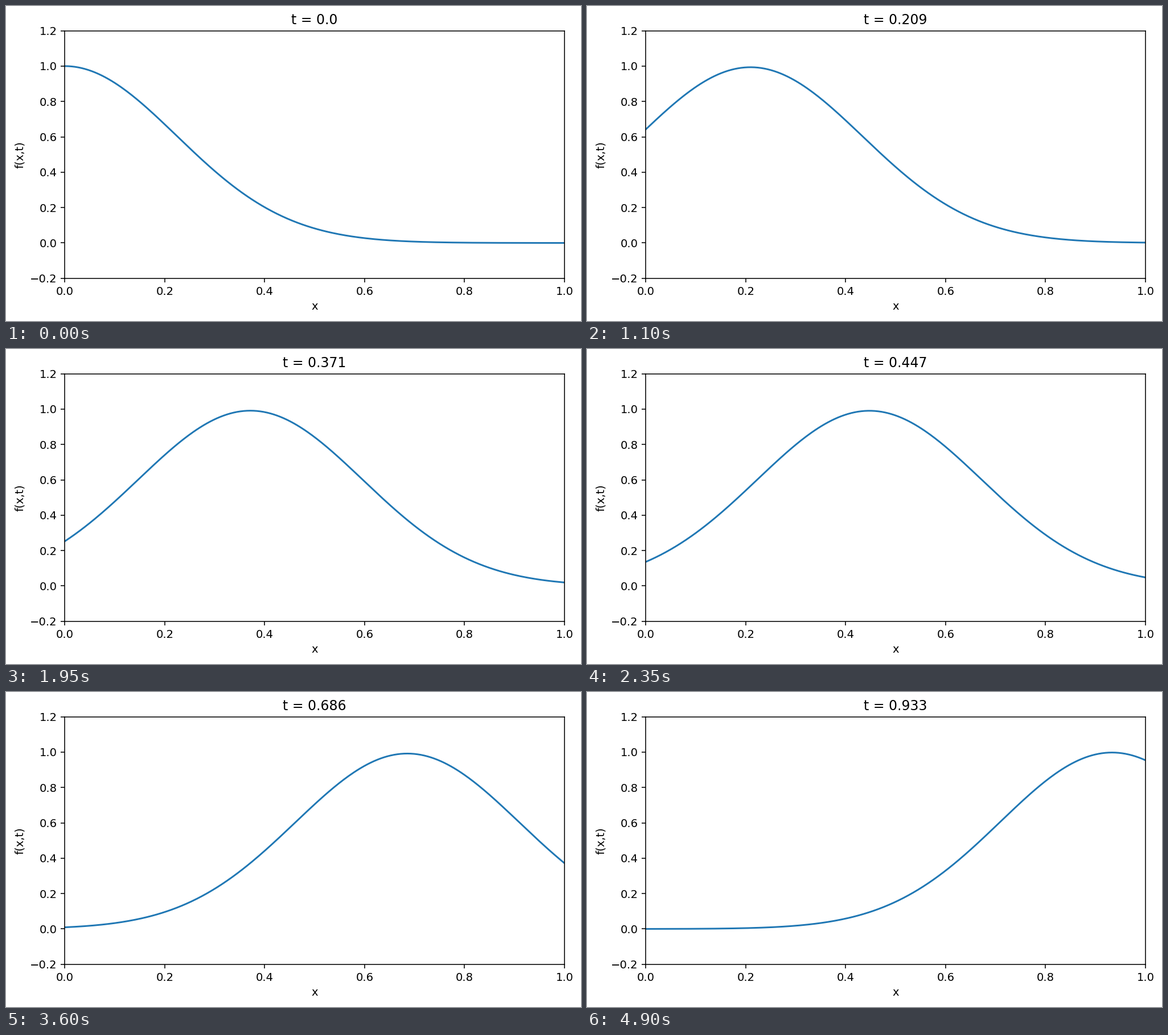
These frames come from a looping animation (1010x555 px, 4950 ms). A matplotlib script:

```python
import numpy as np
import matplotlib.pyplot as plt
from matplotlib.animation import FuncAnimation

WIDTH, HEIGHT, DPI = 1010, 555, 141.6
LEFT, RIGHT, TOP, BOTTOM = 103.4, 980.9, 43.6, 479.8
FRAMES, INTERVAL = 99, 50
TIME_STEP = 0.009521

plt.rcParams["font.family"] = "DejaVu Sans"

x = np.linspace(0, 1, 300)


def pulse(t):
    """Travelling Gaussian that flattens slightly halfway across."""
    spread = t * (1 - t)
    return (1 - 0.038 * spread) * np.exp(-10 * (x - t) ** 2 / (1 + 0.04 * spread))


# The small margin keeps the pixel size from being truncated downwards.
fig = plt.figure(figsize=((WIDTH + 0.01) / DPI, (HEIGHT + 0.01) / DPI),
                 dpi=DPI, facecolor="white")
ax = fig.add_axes([LEFT / WIDTH, 1 - BOTTOM / HEIGHT,
                   (RIGHT - LEFT) / WIDTH, (BOTTOM - TOP) / HEIGHT])
ax.set(xlim=(0, 1), ylim=(-0.2, 1.2), xlabel="x", ylabel="f(x,t)")
line, = ax.plot(x, pulse(0), color="#1f77b4", lw=1.5)
title = ax.set_title("t = 0.0")


def update(frame):
    t = frame * TIME_STEP
    line.set_ydata(pulse(t))
    title.set_text(f"t = {round(t, 3)}")
    return line, title


anim = FuncAnimation(fig, update, frames=FRAMES, interval=INTERVAL,
                     repeat=True, repeat_delay=0, blit=False)
plt.show()
```
